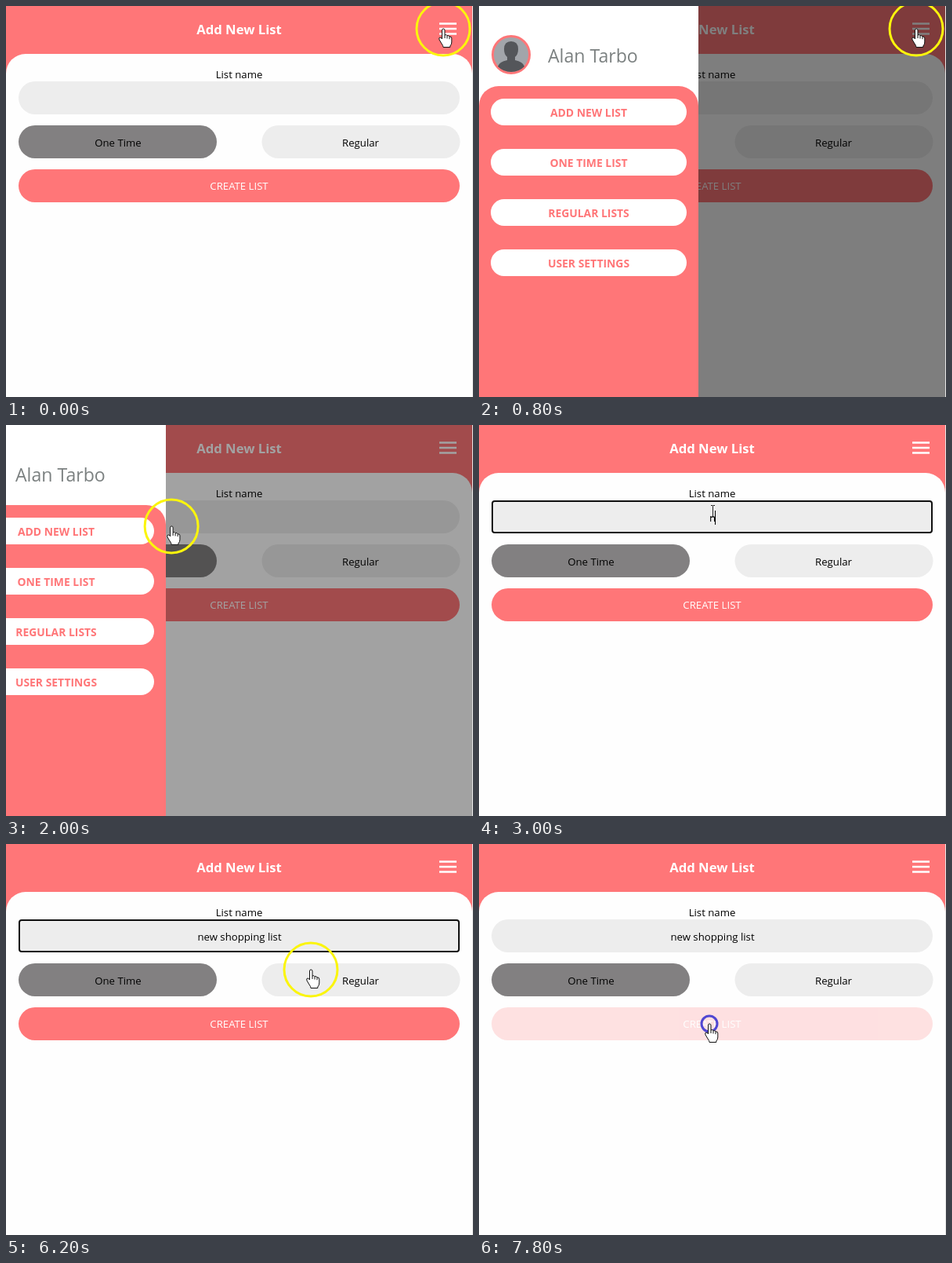
These frames come from a looping animation (596x498 px, 8000 ms). An HTML page:

```html
<!DOCTYPE html>
<html lang="en">
<head>
<meta charset="utf-8">
<title>List app</title>
<style>
  html, body { margin: 0; width: 100%; height: 100%; overflow: hidden; background: #fff; }
  svg { display: block; width: 596px; height: 498px; font: 13.2px "Open Sans", "Noto Sans", sans-serif; }
  .mid { text-anchor: middle; }
  .bold { font-weight: 700; }
</style>
</head>
<body>
<svg viewBox="0 0 596 498">
  <g id="app">
    <rect width="595" height="498" fill="#ff7678"/>
    <path d="M0 498V86a25 25 0 0 1 25-25H570a25 25 0 0 1 25 25V498z" fill="#fefefe"/>
    <text class="mid bold" x="297.5" y="36" font-size="16.7" fill="#fff">Add New List</text>
    <path d="M553 22.5h22M553 29h22M553 35.5h22" stroke="#fff" stroke-width="2.6"/>
    <text class="mid" x="297.5" y="92">List name</text>
    <rect id="field" x="16" y="96" width="563" height="42" fill="#ededed"/>
    <rect id="focus" x="17" y="97" width="561" height="40" rx="3" fill="none" stroke="#101010" stroke-width="2"/>
    <text id="typed" class="mid" x="298" y="123"></text>
    <path id="caret" stroke="#000"/>
    <rect id="once" x="16" y="152" width="253" height="42" rx="21"/>
    <text class="mid" x="143" y="179">One Time</text>
    <rect id="regular" x="326.5" y="152" width="253" height="42" rx="21"/>
    <text class="mid" x="452.5" y="179">Regular</text>
    <g id="create">
      <rect x="16" y="208" width="563" height="42" rx="21" fill="#ff7678"/>
      <text class="mid" x="297.5" y="234" fill="#fff">CREATE LIST</text>
    </g>
  </g>
  <rect id="shade" width="595" height="498"/>
  <g id="drawer">
    <rect width="280" height="498" fill="#fff"/>
    <path d="M0 498V127a25 25 0 0 1 25-25H255a25 25 0 0 1 25 25V498z" fill="#ff7678"/>
    <circle cx="41" cy="62" r="23.5" fill="#a2a5aa" stroke="#ff7678" stroke-width="3"/>
    <path d="M24 77q2-6 12-8v-4q-4-3-4-10 0-10 9-10t9 10q0 7-4 10v4q10 2 12 8-7 7-17 7t-17-7z" fill="#54565a"/>
    <text x="88" y="72" font-size="23.1" fill="#7b8080">Alan Tarbo</text>
    <g id="menu"></g>
  </g>
  <rect x="595" width="1" height="498" fill="#e4e4e4"/>
  <circle id="ring" fill="none"/>
  <g id="pointer" stroke-linejoin="round">
    <path id="hand" fill="#fff" stroke="#111" d="M-1.5 2Q-1.5 0 .3 0 2 0 2 2V8q2.2-1.2 3 .8 2.4-.9 3 1.2 2.8-.5 2.8 2V17q0 3-2 5v1.500H0q0-2-2-4.500L-5 14q-1-3 1-3 1.500 0 2.500 2zM2 8v4M5 9v3.500M8 10.200v3"/>
    <path id="beam" fill="none" stroke="#222" d="M-2.500-7.500h2l.500 1 .500-1h2M0-6.500V6.500M-2.500 7.500h2l.500-1 .500 1h2"/>
    <path id="arrow" fill="#fff" stroke="#111" d="M0 0V16l3.700-3.500 2.500 5.700 2.500-1.100-2.500-5.600H11z"/>
  </g>
</svg>
<script>
const LOOP = 8000, STEP = 200;
const phrase = "new shopping list";
const $ = id => document.getElementById(id);
const set = (id, attrs) => {
  for (const k in attrs) $(id).setAttribute(k, attrs[k]);
};
const show = (id, on) => set(id, { visibility: on ? "visible" : "hidden" });
const within = (t, a, b) => t >= a && t < b;

$("menu").innerHTML = ["ADD NEW LIST", "ONE TIME LIST", "REGULAR LISTS", "USER SETTINGS"].map((label, i) =>
  `<g id="item${i}"><rect x="15" y="${118 + 64 * i}" width="250" height="34" rx="17" fill="#fff"/>
  <text class="mid bold" x="140" y="${141 + 64 * i}" font-size="13.9" fill="#ff7678">${label}</text></g>`).join("");

// time, x, y
const route = [
  [0, 558, 29], [800, 558, 29], [1400, 206, 130], [1900, 206, 130], [2600, 298.5, 110],
  [5800, 298.5, 110], [6200, 389, 160], [6400, 425, 168], [6700, 425, 168],
  [7050, 196, 160], [7250, 196, 160], [7600, 294, 229], [8000, 294, 229]
];
// time, final ring radius
const clicks = [[600, 13], [1600, 12], [2600, 12], [6600, 12], [7200, 12], [7800, 10]];

function pointAt(t) {
  const i = route.findIndex(p => p[0] > t);
  const [t0, x0, y0] = route[i - 1], [t1, x1, y1] = route[i];
  const k = (t - t0) / (t1 - t0), e = k * k * (3 - 2 * k);
  return [x0 + (x1 - x0) * e, y0 + (y1 - y0) * e];
}

function openness(t) {
  if (t < 600 || t >= 2200) return 0;
  return t < 800 || t >= 2000 ? 204 / 280 : 1;
}

function drawPointer(t) {
  const [x, y] = pointAt(t);
  const click = clicks.find(c => within(t, c[0] - STEP, c[0] + STEP));
  const r = click ? (t < click[0] ? 23 : click[1]) : 34;
  set("ring", { cx: x, cy: y, r, stroke: click ? "#5047d2" : "#fbf50c", "stroke-width": 3 });
  show("ring", !within(t, 2800, 5800));
  set("pointer", { transform: `translate(${x} ${y})` });
  const beam = within(t, 2400, 6000);
  const arrow = within(t, 900, 1300) || within(t, 2200, 2400) || t === 6000 || t === 7400;
  show("beam", beam && !arrow);
  show("arrow", arrow);
  show("hand", !beam && !arrow);
}

function drawForm(t) {
  const focused = within(t, 2600, 6600);
  set("field", { rx: focused ? 10 : 21 });
  show("focus", focused);
  const count = t < 3000 ? 0 : Math.min(phrase.length, Math.floor(1 + (t - 3000) * 8 / 1400 + 1e-6));
  $("typed").textContent = phrase.slice(0, count);
  const half = count ? $("typed").getComputedTextLength() / 2 : 0;
  const cx = Math.floor(298 + half) - 0.5;
  set("caret", { d: `M${cx} 109V127` });
  show("caret", within(t, 2600, 5800));
  const regular = within(t, 6600, 7200);
  set("once", { fill: regular ? "#ededed" : "#828081" });
  set("regular", { fill: regular ? "#828081" : "#ededed" });
  set("create", { opacity: t >= 7800 ? 0.21 : 1 });
}

function draw(t) {
  const open = openness(t);
  drawForm(t);
  set("shade", { opacity: open * 0.5 });
  set("drawer", { transform: `translate(${Math.round(280 * (open - 1))} 0)` });
  show("drawer", open > 0);
  set("item0", { opacity: within(t, 1600, 1800) ? 0.66 : 1 });
  drawPointer(t);
}

function tick() {
  const t = performance.now() % LOOP;
  draw(Math.floor(t / STEP) * STEP);
  requestAnimationFrame(tick);
}
tick();
</script>
</body>
</html>
```
